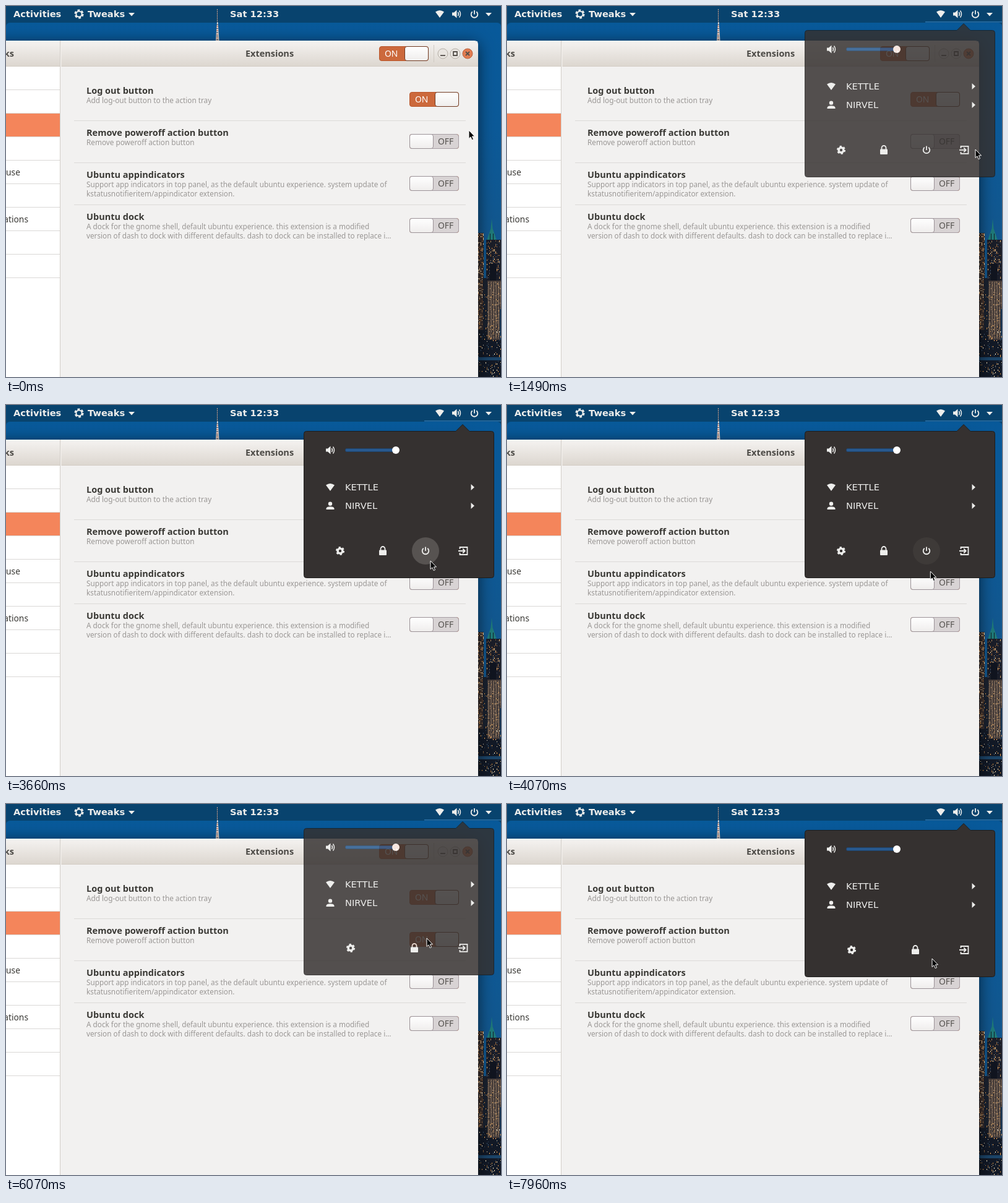
These frames come from a looping animation (800 by 600 pixels, 8 s). An HTML page with a canvas:

```html
<!DOCTYPE html>
<html lang="en">
<head>
<meta charset="utf-8">
<title>Extension settings</title>
<style>
html, body { margin: 0; width: 100%; height: 100%; overflow: hidden; }
canvas, svg { position: absolute; left: 0; top: 0; width: 800px; height: 600px; }
text { font-family: "Noto Sans", "Open Sans", sans-serif; white-space: pre; }
.bold { font-weight: 700; font-size: 14.5px; fill: #3a3935; }
.head { fill: #4c4a46; }
.sub { font-size: 11.75px; fill: #9a9795; }
.side { font-size: 13.8px; fill: #3a3935; text-anchor: end; }
.switch { font-size: 13.9px; }
.shell { font: 14.667px "DejaVu Sans", Verdana, sans-serif; fill: #eeeeec; }
.panel { font-weight: 700; }
.icon { fill: #eeeeec; stroke: none; }
.icon .line { fill: none; stroke: #eeeeec; stroke-width: 1.8; }
</style>
</head>
<body>
<canvas id="wall" width="800" height="600"></canvas>
<svg id="stage" viewBox="0 0 800 600"></svg>
<script>
const LOOP = 8000;

// Wallpaper: blue dusk sky, a spire and lit towers.
function paintWall() {
  const c = document.getElementById('wall').getContext('2d');
  let seed = 11;
  const rnd = () => (seed = seed * 16807 % 2147483647) / 2147483647;
  const box = (color, x, y, w, h) => { c.fillStyle = color; c.fillRect(x, y, w, h); };
  const poly = (color, ...p) => {
    c.fillStyle = color;
    c.beginPath();
    for (let i = 0; i < p.length; i += 2) c.lineTo(p[i], p[i + 1]);
    c.fill();
  };
  const lights = (x, y, w, h, share, colors) => {
    for (let j = y; j < y + h; j += 2)
      for (let i = x; i < x + w; i += 2)
        if (rnd() < share) box(colors[Math.floor(rnd() * colors.length)], i, j, 1, 1 + Math.round(rnd()));
  };
  const sky = c.createLinearGradient(0, 0, 0, 400);
  sky.addColorStop(0, '#07599a');
  sky.addColorStop(.5, '#0b5998');
  sky.addColorStop(1, '#13568c');
  box(sky, 0, 0, 800, 600);

  // Left tower and the dark block beside it.
  box('#3a2f2e', 763, 367, 9, 160);
  lights(763, 368, 9, 156, .6, ['#e9a45c', '#ffe3b4', '#8d5a2f', '#17191f']);
  box('#1a212e', 771, 440, 8, 90);
  lights(771, 442, 8, 86, .15, ['#c98a45', '#46607a']);

  // Main tower with its green roof.
  poly('#1f7a78', 785, 344, 786.5, 360, 790, 370, 793, 379, 777, 379, 780, 370, 783.5, 360);
  box('#12202c', 782, 368, 1, 10);
  box('#12202c', 787, 368, 1, 10);
  box('#1a1d28', 776, 378, 24, 68);
  lights(777, 379, 22, 62, .3, ['#d98c44', '#7b573a', '#f2c27f', '#3f5570']);
  box('#10141f', 782, 417, 10, 27);
  box('#443a37', 778, 444, 22, 96);
  for (let x = 779; x < 800; x += 4) box('#6f5e51', x, 446, 2, 92);
  lights(778, 446, 22, 94, .3, ['#a88a6d', '#1b1e27', '#d9a565', '#23242c']);

  // Waterfront.
  box('#12304f', 798, 490, 2, 50);
  box('#141a26', 763, 524, 15, 76);
  box('#121926', 763, 540, 37, 60);
  lights(763, 526, 37, 44, .16, ['#f0a758', '#34506c', '#fff0cc']);
  box('#1b4468', 763, 568, 37, 5);
  lights(763, 574, 37, 26, .14, ['#d08e46', '#3b5873', '#f3dcb0']);

  box('#08436e', 0, 0, 800, 33);
  c.fillStyle = sky;
  c.beginPath();
  c.roundRect(0, 27, 800, 60, 6);
  c.fill();

  for (let y = 5; y < 28; y++) box(['#b3785f', '#3d4a60', '#d6c6c0'][y % 3], 341, y, 1, 1);
  poly('#e4d9d4', 341, 26, 342.5, 26, 343.5, 40, 344.5, 56, 339, 56, 340, 40);
  for (let y = 30; y < 56; y += 3) box(y % 2 ? '#b3664f' : '#3c3d50', 340, y, 3, 1);

  c.shadowColor = 'rgba(0,0,0,.65)';
  c.shadowBlur = 24;
  c.shadowOffsetY = 4;
  box('#f2f1f0', -40, 57, 802, 600);
}

const text = (cls, x, y, s, more = '') => `<text class="${cls}" x="${x}" y="${y}" ${more}>${s}</text>`;
const rect = (x, y, w, h, fill, more = '') =>
  `<rect x="${x}" y="${y}" width="${w}" height="${h}" fill="${fill}" ${more}/>`;
const at = (x, y, s, more = '') => `<g transform="translate(${x} ${y})" ${more}>${s}</g>`;

const shapes = {
  wifi: '<path d="M-7-3.5Q0-8.500 7-3.500L0 6Z"/>',
  volume: '<path d="M-7-2.500h3l4.500-4v13l-4.500-4h-3z"/><path class="line" style="stroke-width:1.500" d="M2.500-3q2 3 0 6M4.500-5.500q4 5.500 0 11"/>',
  power: '<path class="line" d="M-3.300-4.200A5.300 5.300 0 1 0 3.300-4.200M0-6.500V0"/>',
  gear: '<circle class="line" r="3.900" style="stroke-width:3.400"/><circle class="line" r="5.900" style="stroke-width:2.400;stroke-dasharray:3.100 3.078"/>',
  tweak: '<circle class="line" r="4.600" style="stroke-width:2"/><circle class="line" r="6.400" style="stroke-width:2.400;stroke-dasharray:3.900 2.802"/>',
  lock: '<rect x="-6" y="-1.500" width="12" height="8.500" rx="1"/><path class="line" d="M-3.500-1V-3.500a3.500 3.500 0 0 1 7 0V-1"/>',
  exit: '<path class="line" d="M-5.500-3V-6H6.500V6H-5.500V3M-8 0H2.500M-.800-3.500L2.700 0-.800 3.500"/>',
  person: '<circle cy="-3.300" r="3.200"/><path d="M-6.500 6V4.500Q-6 1.200 0 1.200T6.500 4.500V6Z"/>',
  down: '<path d="M-5-2.500H5L0 3Z"/>',
  right: '<path d="M-2.500-5L3 0-2.500 5Z"/>'
};
const icon = (name, x, y) => at(x, y, shapes[name], 'class="icon"');

const toggle = (x, y, on, id = '') => at(x, y, `
  ${rect(.5, .5, 79, 23, '#cc693c', 'rx="3.500" stroke="#b9562b"')}
  ${text('switch', 9, 17, 'ON', 'fill="#fff"')}
  <g class="off" opacity="${on ? 0 : 1}">${rect(.5, .5, 79, 23, '#d8d3d4', 'rx="3.500" stroke="#a79ea4"')}
  ${text('switch', 46, 17, 'OFF', 'fill="#55524f"')}</g>
  <g class="knob" transform="translate(${on ? 41 : 0} 0)">
  ${rect(.5, .5, 38, 23, 'url(#knob)', `rx="3.500" stroke="${on ? '#713a22' : '#9b9297'}"`)}</g>`,
  id && `id="${id}"`);

const rows = [
  ['Log out button', 'Add log-out button to the action tray'],
  ['Remove poweroff action button', 'Remove poweroff action button'],
  ['Ubuntu appindicators', 'Support app indicators in top panel, as the default ubuntu experience. system update of',
    'kstatusnotifieritem/appindicator extension.'],
  ['Ubuntu dock', 'A dock for the gnome shell, default ubuntu experience. this extension is a modified',
    'version of dash to dock with different defaults. dash to dock can be installed to replace i…']
];

const rowMarkup = rows.map(([title, ...lines], i) => {
  const y = 142 + 68 * i;
  return text('bold', 130, y, title)
    + lines.map((s, k) => text('sub', 130, y + 15 + 15 * k, s)).join('')
    + toggle(652, y - 3, i === 0, 'switch' + i)
    + (i < 3 ? rect(110, y + 43, 633, 1, '#dcdad8') : '');
}).join('');

const sideLines = Array.from({ length: 9 }, (_, i) => rect(0, 135 + 38 * i, 87, 1, '#dad8d6')).join('');

const windowButton = (x, mark, fill = '#e9e5e0', edge = '#b5aea6') => at(x, 77,
  `<circle r="8" fill="${fill}" stroke="${edge}"/><path d="${mark}" fill="none" stroke="#55504b" stroke-width="1.800"/>`);

// The action buttons change once the power button is removed.
const actions = [
  { name: 'gear', x: 540, alone: 557 },
  { name: 'lock', x: 609, alone: 660 },
  { name: 'power', x: 678 },
  { name: 'exit', x: 739, alone: 739 }
];

const stage = document.getElementById('stage');
stage.innerHTML = `
<defs>
  <linearGradient id="bar" x2="0" y2="1"><stop stop-color="#f5f3f1"/><stop offset="1" stop-color="#dcd6cf"/></linearGradient>
  <linearGradient id="knob" x2="0" y2="1"><stop stop-color="#fff"/><stop offset="1" stop-color="#efedec"/></linearGradient>
</defs>
${text('shell panel', 12, 18, 'Activities')}
${icon('tweak', 118, 13)}
${text('shell panel', 132, 18, 'Tweaks')}
${icon('down', 203, 13.5)}
${text('shell panel', 362, 18, 'Sat 12:33')}
${icon('wifi', 701, 13)}${icon('volume', 728, 13)}${icon('power', 757, 13.5)}${icon('down', 780, 13.5)}
${rect(676, 25, 124, 1.5, '#2a73ab', 'id="active"')}

${rect(0, 98, 763, 502, '#f2f1f0')}
<path d="M0 56H757q6 0 6 6V98H0Z" fill="url(#bar)"/>
${rect(0, 97, 763, 1, '#d3ccc4')}
${rect(0, 98, 87, 502, '#fff')}
${sideLines}
${rect(0, 174, 87, 37, '#f4855b')}
${rect(87, 56, 1, 544, '#d2cec9')}${rect(88, 56, 1.5, 42, '#f1eeea')}
${text('bold head', 13, 82, 'Tweaks', 'text-anchor="end"')}
${text('side', 23, 274, 'Keyboard &amp; Mouse')}
${text('side', 36, 350, 'Startup Applications')}
${text('bold head', 426, 82, 'Extensions', 'text-anchor="middle"')}
${toggle(603, 65, true)}
${rect(691, 63, 1, 28, '#cfc9c2')}
${windowButton(706, 'M-4 3H4')}
${windowButton(726, 'M-3-3H3V3H-3Z')}
${windowButton(746, 'M-3-3L3 3M3-3L-3 3', '#e27c51', '#b9603c')}
${rect(110, 186, 633, 67, '#f6f5f4', 'id="rowHover"')}
${rowMarkup}

<g id="menu">
  <path d="M485.500 42.500H727L738 31.500 749 42.500H784.500q4 0 4 4V275.500q0 4-4 4H485.500q-4 0-4-4V46.500q0-4 4-4z" fill="#353130" stroke="#1d1c1b"/>
  ${icon('volume', 524, 73)}
  ${rect(548.5, 70.5, 82, 5, '#28598f', 'rx="2" stroke="#1f4268"')}
  <circle cx="630" cy="73" r="6" fill="#fff"/>
  ${icon('wifi', 524, 133)}${text('shell', 548, 138, 'KETTLE')}${icon('right', 754, 133)}
  ${icon('person', 524, 163)}${text('shell', 548, 168, 'NIRVEL')}${icon('right', 754, 163)}
  ${actions.map(a => `<g id="${a.name}"><circle class="halo" r="22" fill="#575351"/>${icon(a.name, 0, 0)}</g>`).join('')}
</g>
<path id="cursor" d="M0 0V13.500L3 10.800 5.200 15.700 7.500 14.600 5.400 9.900H9.500Z" fill="#000" stroke="#fff" stroke-width="1"/>`;

const $ = id => document.getElementById(id);
const clamp = v => Math.max(0, Math.min(1, v));

// Pointer stops: time, x, y.
const stops = [
  [40, 748, 201], [280, 757, 232], [1750, 757, 232], [1950, 712, 257], [2110, 686, 252],
  [3950, 686, 252], [4110, 684, 272], [4420, 680, 219], [4590, 680, 219], [4640, 680, 218],
  [5130, 680, 218], [5140, 680, 217], [6240, 680, 217], [6480, 600, 247], [6680, 517, 262],
  [7000, 662, 240], [7070, 662, 240], [7280, 788, 242], [7490, 746, 240],
  [7810, 746, 240], [7960, 687, 250]
];

function pointer(t) {
  const i = stops.findIndex(s => s[0] > t);
  if (i === 0) return stops[0].slice(1);
  if (i < 0) return stops[stops.length - 1].slice(1);
  const [t0, x0, y0] = stops[i - 1], [t1, x1, y1] = stops[i];
  const u = (t - t0) / (t1 - t0), k = u * u * (3 - 2 * u);
  return [x0 + (x1 - x0) * k, y0 + (y1 - y0) * k];
}

// The popup fades in a few discrete steps.
const rise = (t, start, step) => t < start ? 0 : Math.min(1, .18 + .33 * Math.floor((t - start) / step));
const menuAt = t => rise(t, 1410, 40) - rise(t, 4285, 45) + rise(t, 5970, 50);

// Average of recent pointer hits gives a short hover fade.
function hover(t, x) {
  let sum = 0;
  for (let k = 0; k < 4; k++) {
    const s = t - k * 25, [px, py] = pointer(s);
    if (menuAt(s) > .99 && Math.hypot(px - x, py - 236) < 22) sum += .25;
  }
  return sum;
}

function draw(t) {
  const [x, y] = pointer(t), open = menuAt(t), on = clamp((t - 4870) / 120);
  $('cursor').setAttribute('transform', `translate(${x} ${y})`);

  $('menu').setAttribute('opacity', open);
  $('menu').setAttribute('transform', `translate(0 ${-10 * clamp(1 - open) ** .65})`);
  $('active').setAttribute('opacity', open > .01 ? 1 : 0);
  $('rowHover').setAttribute('opacity', open < .01 && x < 743 && y > 186 && y < 253 ? 1 : 0);

  const sw = $('switch1');
  sw.querySelector('.off').setAttribute('opacity', 1 - on);
  sw.querySelector('.knob').setAttribute('transform', `translate(${41 * on} 0)`);
  sw.querySelector('.knob rect').setAttribute('stroke', on > .5 ? '#713a22' : '#9b9297');

  const pulse = 1 - .4 * Math.sin(Math.PI * clamp((t - 3240) / 420));
  for (const a of actions) {
    const pos = t < 5000 ? a.x : a.alone, g = $(a.name);
    g.setAttribute('display', pos ? 'inline' : 'none');
    if (!pos) continue;
    g.setAttribute('transform', `translate(${pos} 236)`);
    g.querySelector('.halo').setAttribute('opacity', hover(t, pos) * (a.name === 'power' ? pulse : 1));
  }
}

paintWall();
const begin = performance.now();
function tick() {
  draw((performance.now() - begin) % LOOP);
  requestAnimationFrame(tick);
}
tick();
</script>
</body>
</html>
```
